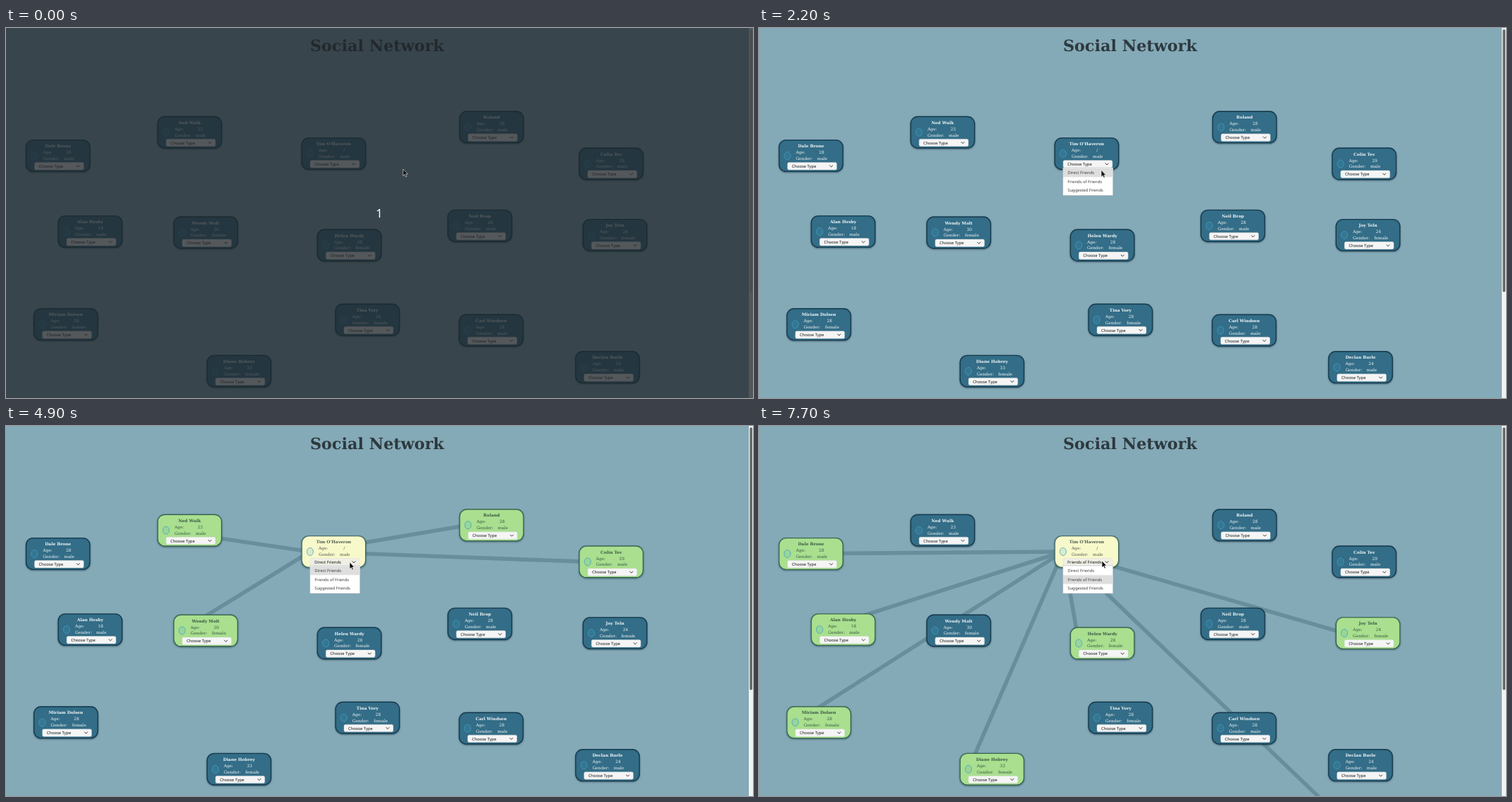
Recreate the animation shown at these times as an HTML page. Size 1063 by 527 pixels, loop 8000 ms.

```html
<!DOCTYPE html>
<html lang="en">
<head>
<meta charset="utf-8">
<title>Social Network</title>
<style>
html, body { margin: 0; width: 100%; height: 100%; overflow: hidden; background: #84a9b7; }
svg { display: block; width: 100vw; height: 100vh; cursor: default; }
text { text-rendering: geometricPrecision; stroke: none; white-space: pre; }
h1, .title { font: bold 22.4px "DejaVu Serif", serif; fill: #2d393e; }

.node { color: #f2f6f8; fill: #336d87; stroke: #143a4d; }
.node text { font: 5.9px "DejaVu Serif", serif; fill: currentColor; }
.node .name { font-weight: bold; }
.card { stroke-width: 1.4; filter: drop-shadow(.5px 1px 1.2px rgba(0, 20, 30, .45)); }
.dot { fill: rgba(70, 170, 200, .16); stroke: #3f9fc8; stroke-opacity: .85; stroke-width: .9; }
.select { fill: #f5f5f5; stroke: #d5d9da; stroke-width: .4; }
.node .ui, .menu text { font: 5.8px "Noto Sans", "Open Sans", sans-serif; fill: #111; }
.menu text { fill: #3c3c3c; }
.chevron { fill: none; stroke: #222; stroke-width: .9; }
.edges line { stroke: #688e9c; stroke-width: 5.6; }
.count { font: 17px "Noto Sans", "Open Sans", sans-serif; fill: #fff; }

/* one shared 8 s clock, all hard changes */
.anim { animation: 8s step-end infinite; }
.phase0 { animation-name: phase0; }
.phase1 { animation-name: phase1; }
.phase2 { animation-name: phase2; }
.direct { animation-name: direct; }
.fof { animation-name: fof; }
.self { animation-name: self; }
.self-select { animation-name: self-select; }
.veil { animation-name: veil; }
.thumb { animation-name: thumb; }
.menu { animation-name: menu; }
.hover { animation-name: hover; }
.pointer { animation-name: pointer; }

@keyframes phase0 { 0% { visibility: visible } 31.25%, 100% { visibility: hidden } }
@keyframes phase1 { 0% { visibility: hidden } 31.25% { visibility: visible } 75%, 100% { visibility: hidden } }
@keyframes phase2 { 0% { visibility: hidden } 75%, 100% { visibility: visible } }
@keyframes direct {
  31.25% { color: #3a5843; fill: #a9df8f; stroke: #3a6a52 }
  75% { color: #f2f6f8; fill: #336d87; stroke: #143a4d }
}
@keyframes fof { 75%, 100% { color: #3a5843; fill: #a9df8f; stroke: #3a6a52 } }
@keyframes self { 31.25%, 100% { color: #4b5a50; fill: #f8f9ca; stroke: #477068 } }
@keyframes self-select { 31.25%, 100% { fill: #efefe6 } }
@keyframes veil { 0% { visibility: visible } 6.25%, 100% { visibility: hidden } }
@keyframes thumb { 0% { fill: #c8cbcb } 17.5%, 100% { fill: #676767 } }
@keyframes menu {
  0% { visibility: hidden } 18.75% { visibility: visible }
  30% { visibility: hidden } 61.25% { visibility: visible }
  72.5% { visibility: hidden } 93.75%, 100% { visibility: visible }
}
@keyframes hover {
  0% { opacity: 0; transform: none }
  26.25% { opacity: 1; transform: none }
  66.25%, 100% { opacity: 1; transform: translateY(12.7px) }
}
@keyframes pointer {
  0% { transform: translate(565px, 201px) }
  6.25% { transform: translate(565px, 201px); animation-timing-function: steps(7) }
  15% { transform: translate(487px, 193px) }
  23.75% { transform: translate(487px, 195px) }
  26.25% { transform: translate(487px, 199px) }
  27.5% { transform: translate(487px, 202.5px) }
  38.75% { transform: translate(490px, 206px); animation-timing-function: steps(2) }
  41.25% { transform: translate(500px, 200px); animation-timing-function: steps(2) }
  43.75% { transform: translate(498px, 193px) }
  47.5% { transform: translate(599px, 180.5px); animation-timing-function: steps(2) }
  50% { transform: translate(662px, 171.5px); animation-timing-function: steps(6) }
  57.5% { transform: translate(494px, 193.5px) }
  58.75% { transform: translate(489px, 194px) }
  65% { transform: translate(489px, 204px) }
  66.25% { transform: translate(490px, 213px) }
  67.5% { transform: translate(491px, 216px) }
  86.25% { transform: translate(491px, 201.5px) }
  87.5% { transform: translate(493px, 200px) }
  88.75% { transform: translate(494.5px, 198px) }
  91.25% { transform: translate(502px, 191px) }
  92.5% { transform: translate(499px, 189px) }
  93.75% { transform: translate(494px, 190px) }
  96.25%, 100% { transform: translate(488px, 192px) }
}
</style>
</head>
<body>
<svg viewBox="0 0 1063 527" preserveAspectRatio="none">
  <rect width="1063" height="527" fill="#84a9b7"/>
  <text class="title" x="528" y="32.6" text-anchor="middle">Social Network</text>
  <g id="edges1" class="edges anim phase1"></g>
  <g id="edges2" class="edges anim phase2"></g>
  <g id="nodes"></g>

  <g class="menu anim">
    <rect x="432.7" y="199" width="71" height="39.3" fill="#fff" stroke="#b9bfc1" stroke-width=".6"/>
    <rect class="hover anim" x="433" y="199.6" width="70.4" height="12.7" fill="#dedede"/>
    <text x="439.3" y="208.1">Direct Friends</text>
    <text x="439.3" y="220.7">Friends of Friends</text>
    <text x="439.3" y="233.4">Suggested Friends</text>
  </g>

  <rect x="1057" width="6" height="527" fill="#f0f1f1"/>
  <rect class="thumb anim" x="1058.4" y="2" width="3.6" height="374" rx="1.8"/>

  <g class="veil anim">
    <rect width="1063" height="527" fill="rgba(31,36,40,.75)"/>
    <text class="count" x="531" y="270" text-anchor="middle">1</text>
  </g>

  <g class="pointer anim">
    <path d="M0 0V9.6L2.2 7.6L3.8 11L5.3 10.3L3.8 7H6.6Z" fill="#0a0a0a" stroke="#fff" stroke-width=".6"/>
  </g>
</svg>
<script>
const people = [
  // name, age, gender, left, top, role
  ["Dale Brone", 28, "male", 28, 159, "fof"],
  ["Ned Wulk", 23, "male", 215.3, 125.6, "direct"],
  ["Tim O'Haveron", "/", "male", 420.3, 156, "self"],
  ["Roland", 28, "male", 645, 118.2, "direct"],
  ["Colin Tev", 29, "male", 815.2, 170.4, "direct"],
  ["Alan Hesby", 18, "male", 73.8, 267, "fof"],
  ["Wendy Molt", 30, "female", 238.2, 268.4, "direct"],
  ["Helen Wardy", 28, "female", 442.6, 286.4, "fof"],
  ["Neil Brop", 28, "male", 628.3, 258.8, ""],
  ["Joy Teln", 24, "female", 820.6, 272, "fof"],
  ["Miriam Dolsen", 28, "female", 39.2, 399.2, "fof"],
  ["Tina Vory", 28, "female", 468.4, 392.6, ""],
  ["Carl Windsen", 28, "male", 644.4, 407.6, ""],
  ["Diane Hobrey", 33, "female", 285.6, 465.8, "fof"],
  ["Declan Burle", 24, "male", 810, 460.2, ""]
];
const dot = { x: 12.4, y: 23 };
const hub = people.find(p => p[5] === "self");

const label = (text, cls = "") => `<text class="ui ${cls}" x="18.7" y="40.1">${text}</text>`;

function node([name, age, gender, x, y, role]) {
  const self = role === "self";
  const labels = self
    ? label("Choose Type", "anim phase0") + label("Direct Friends", "anim phase1") + label("Friends of Friends", "anim phase2")
    : label("Choose Type");
  return `<g class="node ${role && "anim " + role}" transform="translate(${x} ${y})">
    <rect class="card" x=".6" y=".6" width="90.8" height="44.8" rx="10"/>
    <ellipse class="dot" cx="${dot.x}" cy="${dot.y}" rx="4.6" ry="5.5"/>
    <text class="name" x="46" y="11.2" text-anchor="middle">${name}</text>
    <text x="24.4" y="20.2">Age:</text>
    <text x="61" y="20.2" text-anchor="middle">${age}</text>
    <text x="24.4" y="29.1">Gender:</text>
    <text x="54.8" y="29.1">${gender}</text>
    <rect class="select ${self ? "anim self-select" : ""}" x="12.6" y="32.6" width="70" height="10.4" rx="2"/>
    ${labels}
    <path class="chevron" d="M72.3 36.5l2.4 2.4l2.4 -2.4"/>
  </g>`;
}

const edge = ([, , , x, y]) =>
  `<line x1="${hub[3] + dot.x}" y1="${hub[4] + dot.y}" x2="${x + dot.x}" y2="${y + dot.y}"/>`;
const edgesTo = role => people.filter(p => p[5] === role).map(edge).join("");

// one more friend sits below the fold
const below = ["", "", "", 888, 605];

document.getElementById("nodes").innerHTML = people.map(node).join("");
document.getElementById("edges1").innerHTML = edgesTo("direct");
document.getElementById("edges2").innerHTML = edgesTo("fof") + edge(below);
</script>
</body>
</html>
```
